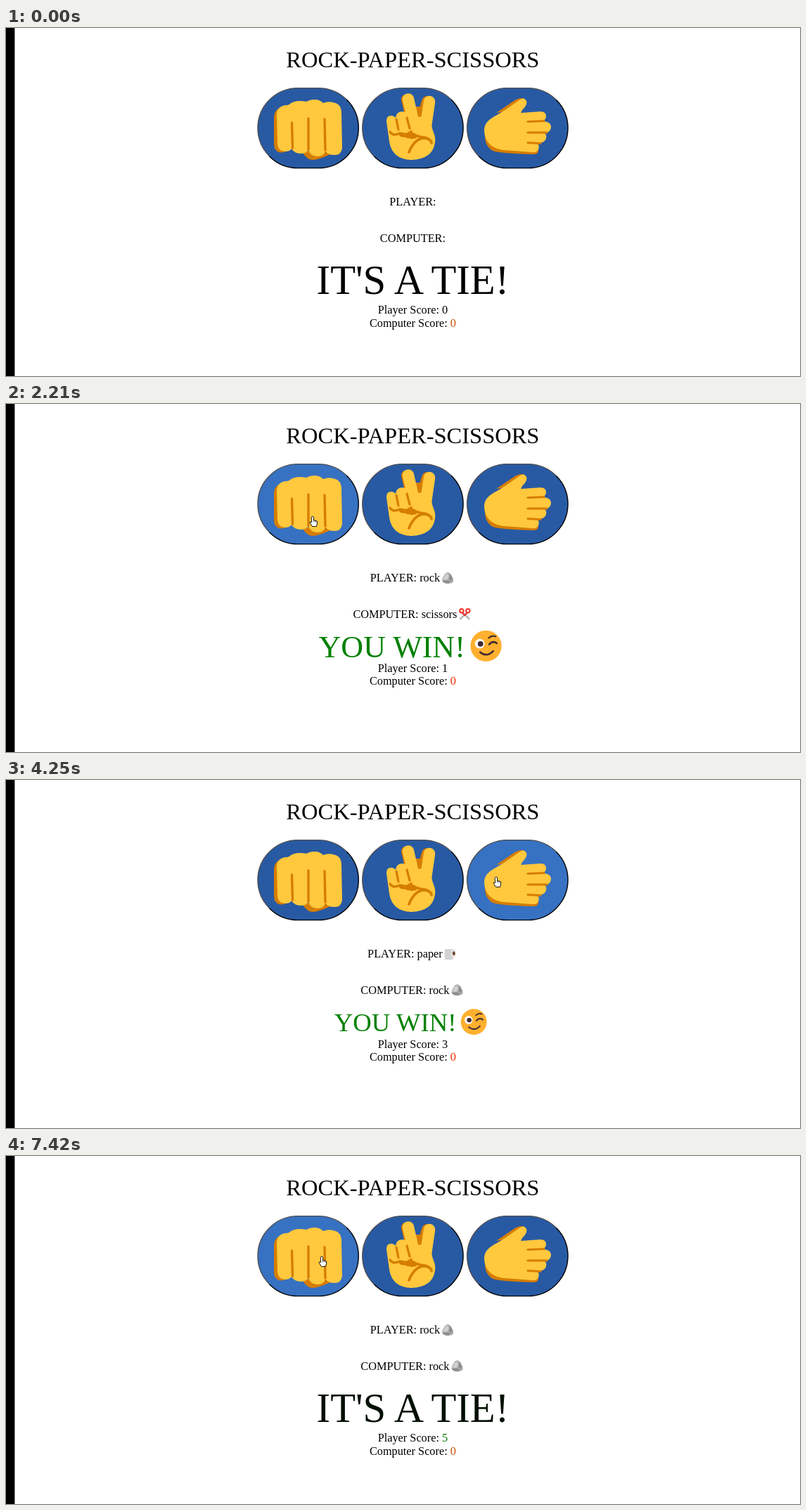
Write an HTML page with a canvas that moves like this. It is 1129 by 496 pixels and loops after 8 s.

```html
<!DOCTYPE html>
<html lang="en">
<head>
<meta charset="utf-8">
<title>Rock Paper Scissors</title>
<style>
html, body { margin: 0; width: 100%; height: 100%; overflow: hidden; background: #fff; }
canvas { display: block; }
</style>
</head>
<body>
<canvas id="stage" width="1129" height="496"></canvas>
<script>
const ctx = document.getElementById('stage').getContext('2d');
const LOOP = 8000, MID = 578.4, BASE = 16.3, EMOJI_ADVANCE = 1.35;
const SKIN = '#ffc83d', SHADE = '#d67d00', BLACK = [0, 0, 0], GREEN = [0, 128, 0];
const ORANGE = '#c85000', RED = '#f32b00';

// Kerns across spaces too, as page text does.
ctx.textRendering = 'optimizeLegibility';

// Results, each shown from time t on.
const rounds = [
  { t: 0, score: 0, ink: '#000' },
  { t: 1880, player: 'rock', computer: 'scissors', score: 1, win: true, ink: '#000' },
  { t: 3040, player: 'scissors', computer: 'paper', score: 2, win: true, ink: '#000' },
  { t: 4110, player: 'paper', computer: 'rock', score: 3, win: true, ink: '#000' },
  { t: 5130, player: 'scissors', computer: 'paper', score: 4, win: true, ink: '#2c3a08' },
  { t: 6140, player: 'rock', computer: 'scissors', score: 5, win: true, ink: '#0a760a' },
  { t: 7080, player: 'rock', computer: 'rock', score: 5, ink: '#0a760a' }
];

const buttons = [
  { name: 'rock', x: 358, hovers: [[1390, 2590], [5920, 9000]] },
  { name: 'scissors', x: 506.8, hovers: [[2610, 3830], [4855, 5910]] },
  { name: 'paper', x: 655.7, hovers: [[3840, 4850]] }
];

// Pointer stops: time, x, y.
const stops = [
  [110, 983, 473], [710, 630, 359], [920, 630, 359], [1400, 439, 187],
  [1670, 436, 160], [2480, 436, 160], [2840, 609, 154], [3000, 608, 152],
  [3650, 608, 152], [4040, 697, 138], [4670, 697, 138], [5060, 603, 139],
  [5670, 603, 139], [6080, 449, 143], [8000, 449, 143]
];

const clamp = v => Math.max(0, Math.min(1, v));
const lerp = (a, b, p) => a + (b - a) * p;
const smooth = p => p * p * (3 - 2 * p);
const mix = (a, b, p) => `rgb(${a.map((v, i) => Math.round(lerp(v, b[i], p)))})`;

function fill(d, color) {
  ctx.fillStyle = color;
  ctx.fill(new Path2D(d));
}

function stroke(d, color, width) {
  ctx.strokeStyle = color;
  ctx.lineWidth = width;
  ctx.lineCap = ctx.lineJoin = 'round';
  ctx.stroke(new Path2D(d));
}

function disc(x, y, r, color) {
  ctx.fillStyle = color;
  ctx.beginPath();
  ctx.arc(x, y, r, 0, 7);
  ctx.fill();
}

function at(x, y, scale, draw) {
  ctx.save();
  ctx.translate(x, y);
  ctx.scale(scale, scale);
  draw();
  ctx.restore();
}

const hands = {
  rock() {
    fill('M381 128Q381 119 387 115L400 125V174Q393 180 386 176Q381 173 381 165Z', SHADE);
    fill('M422 178Q428 188 437 188Q443 188 464 179L455 168Z', SHADE);
    fill('M385 124Q385 112 397 110Q402 110 404 108Q409 104 418 104Q423 104 427 105Q432 102 439 102Q446 102 451 107Q458 104 465 106Q477 108 477 121L478 171Q477 181 467 181Q458 181 454 175Q452 183 443 183Q433 183 430 174Q427 179 419 179Q410 179 406 172Q404 176 397 176Q386 175 386 165Z', SKIN);
    stroke('M406.5 135L407.5 171M430 129V173M453 130L454 174', SHADE, 3.4);
  },
  scissors() {
    stroke('M570 102L576 127M599 105L592 130', SHADE, 16);
    fill('M583 112H592L590 131H579Z', SHADE);
    stroke('M572 101.5L580 137M602 105L597 139', SKIN, 16.5);
    fill('M541 133Q541 125 547 125Q552 125 554 128Q555 119 564 119Q570 119 573 128L605 125Q604 140 608 149Q611 156 610 163Q607 187 576 188Q549 187 545 162Z', SKIN);
    stroke('M546 148Q550 154 557 151M555 130L558 145M559 151Q565 157 572 150M570 128L574 143', SHADE, 3.2);
    fill('M558 148Q563 157 577 158Q584 158 586 154L577 145L570 150Z', SHADE);
    fill('M577 146Q579 136 589 136Q597 138 603 146L607 154L603 159Q596 154 588 155Q579 153 577 146Z', SKIN);
    stroke('M573 177Q577 166 585 160Q592 155 600 158Q605 160 605 164', SHADE, 3.6);
    stroke('M579 151Q588 156 597 156L604 161', SHADE, 3.2);
  },
  paper() {
    fill('M682 147Q678 166 692 175Q703 179 750 180Q757 180 757 174L700 150Z', SHADE);
    fill('M697 121L722 104Q731 98 737 101L728 116Z', SHADE);
    fill('M680 145Q680 133 698 124Q710 117 718 111Q725 106 731 102Q737 98 740 104Q742 109 734 117L732 121L760 119Q768 119 768 126Q768 131 762 133Q775 133 775 141Q775 148 766 150Q769 152 768 157Q767 163 756 165Q759 168 757 173Q755 178 748 177L707 174Q690 172 683 159Q680 153 680 145Z', SKIN);
    stroke('M742 133.5L765 132.5M742 149L769 149M742 163.5L760 164.5', SHADE, 3);
  }
};

// Small symbols, about 16 units wide around the origin.
const symbols = {
  rock() {
    fill('M-8 4Q-8 0-5-4Q-3-8 1-8L5-5L8 2V5Q6 8 0 8Q-6 8-8 4Z', '#a8a8a8');
    fill('M-7 2L-4-4L0-7L2-2L-1 3Z', '#cfcfcf');
    fill('M3-6L7 1L4 4L2 0Z', '#8b8b8b');
    fill('M-7 4L-1 3L4 5L1 8L-5 7Z', '#8f8f8f');
  },
  scissors() {
    stroke('M-3-2L6 7M3-2L-6 7', '#b5b5b9', 2.6);
    stroke('M-3-1L0 2L3-1', '#e8352e', 2.2);
    for (const x of [-4.5, 4.5]) {
      ctx.beginPath();
      ctx.arc(x, -4.5, 2.7, 0, 7);
      ctx.strokeStyle = '#f23b30';
      ctx.lineWidth = 2.2;
      ctx.stroke();
    }
  },
  paper() {
    fill('M-6-7H4Q7-7 7-2Q7 4 4 5V8H-8V-4Q-8-7-6-7Z', '#d3d3d3');
    fill('M4-7Q8-7 8-1Q8 5 4 5Q1 4 1-1Q1-7 4-7Z', '#e9e5e2');
    fill('M5-4Q7-3 7-1Q7 2 5 2Q3 1 3-1Q3-3 5-4Z', '#70492d');
  },
  wink() {
    disc(0, 0, 8.2, '#ffb02e');
    disc(-3.3, -1.2, 2.55, '#fff');
    disc(-2.9, -1.1, 1.45, '#402a32');
    stroke('M1.7-.8Q3.5-3 5.7-1.4', '#402a32', .95);
    stroke('M-3.1 3.3Q.4 6.2 3.8 2.7', '#402a32', .95);
    stroke('M1.4-4.2Q3-5.8 5.1-5', '#402a32', .8);
  }
};

function line(text, y, size, color = '#000', symbol, symbolY = y - 5.5) {
  ctx.font = `${size}px "Liberation Serif", "Times New Roman", serif`;
  ctx.fillStyle = color;
  const width = ctx.measureText(text).width;
  const advance = symbol ? size * EMOJI_ADVANCE : 0;
  const left = MID - (width + advance) / 2;
  ctx.fillText(text, left, y);
  if (symbol) at(left + width + advance / 2, symbolY, size / BASE, symbols[symbol]);
}

function scoreLine(label, score, y, color) {
  ctx.font = `${BASE}px "Liberation Serif", "Times New Roman", serif`;
  const labelWidth = ctx.measureText(label).width;
  const left = MID - (labelWidth + ctx.measureText(score).width) / 2;
  ctx.fillStyle = '#000';
  ctx.fillText(label, left, y);
  ctx.fillStyle = color;
  ctx.fillText(score, left + labelWidth, y);
}

function hoverLevel(hovers, t) {
  return Math.max(...hovers.map(([on, off]) => Math.min(clamp((t - on) / 200), 1 - clamp((t - off) / 200))));
}

function drawButton({ name, x, hovers }, t) {
  const pressed = rounds.some(r => r.player === name && t >= r.t - 110 && t < r.t);
  const [w, h, y] = [143.3, 114, 85.6], cx = x + w / 2, cy = y + h / 2;
  const edge = ctx.createLinearGradient(cx - 41, cy - 56, cx + 41, cy + 56);
  const tones = pressed ? ['#000', '#4c4c4c'] : ['#4c4c4c', '#000'];
  edge.addColorStop(.5, tones[0]);
  edge.addColorStop(.5, tones[1]);
  ctx.beginPath();
  ctx.roundRect(x, y, w, h, 57);
  ctx.fillStyle = mix([40, 90, 164], [55, 113, 194], hoverLevel(hovers, t));
  ctx.fill();
  ctx.strokeStyle = edge;
  ctx.lineWidth = 1.4;
  ctx.stroke();
  hands[name]();
}

function drawResult(round, t) {
  const index = rounds.indexOf(round);
  if (round.win) {
    const first = rounds[1].t;
    const pop = t < 2210 ? smooth(clamp((t - first) / (2210 - first))) : 1 - clamp((t - 2210) / 540);
    at(MID, 344.8, 1 + .2 * pop, () => {
      ctx.translate(-MID, -344.8);
      line('YOU WIN!', 358, 36.7, mix(BLACK, GREEN, clamp((t - first) / 300)), 'wink', 344.8);
    });
  } else {
    const fade = index ? Math.min(.88, (t - round.t) / 380) : 1;
    line("IT'S A TIE!", 379, 58.7, mix(GREEN, BLACK, fade));
  }
  scoreLine('Player Score: ', round.score, round.win ? 382 : 407.3, round.ink);
  scoreLine('Computer Score: ', 0, round.win ? 400.2 : 426.2, round.win ? RED : ORANGE);
}

function drawPointer(t) {
  if (t < stops[0][0]) return;
  const next = stops.findIndex(s => s[0] > t);
  const [a, b] = [stops[next - 1], stops[next]];
  const p = smooth((t - a[0]) / (b[0] - a[0]));
  const x = lerp(a[1], b[1], p), y = lerp(a[2], b[2], p);
  at(x, y, 1, () => {
    if (y < 200) {
      const hand = 'M-1.6 1Q0-1 1.5 1V5.5L5.5 6.5Q7 7 6.8 9L5.5 14.5H-.5L-4 9Q-4.2 7-1.6 8.5Z';
      fill(hand, '#fff');
      stroke(hand, '#000', .9);
      stroke('M1.5 5.5V8M3.5 6.2V8M5.3 6.7V8.5', '#000', .6);
    } else if (x > 440 && x < 712 && y > 324 && y < 430) {
      stroke('M-1.5-10H1.5M0-10V10M-1.5 10H1.5', '#000', 1);
    } else {
      const arrow = 'M0 0V15L3.5 12L6 18L8.3 17L6 11.3H11Z';
      fill(arrow, '#fff');
      stroke(arrow, '#000', .9);
    }
  });
}

function draw(now) {
  const t = now % LOOP;
  const round = rounds.filter(r => r.t <= t).pop();
  ctx.fillStyle = '#fff';
  ctx.fillRect(0, 0, 1129, 496);
  ctx.fillStyle = '#000';
  ctx.fillRect(0, 0, 12.4, 496);
  line('ROCK-PAPER-SCISSORS', 55.5, 32.5);
  buttons.forEach(b => drawButton(b, t));
  line(round.player ? `PLAYER: ${round.player}` : 'PLAYER:', 253.4, BASE, '#000', round.player);
  line(round.computer ? `COMPUTER: ${round.computer}` : 'COMPUTER:', 304.7, BASE, '#000', round.computer);
  drawResult(round, t);
  drawPointer(t);
}

let start;
function tick(now) {
  start ??= now;
  draw(Math.max(0, now - start));
  requestAnimationFrame(tick);
}
draw(0);
requestAnimationFrame(tick);
</script>
</body>
</html>
```
